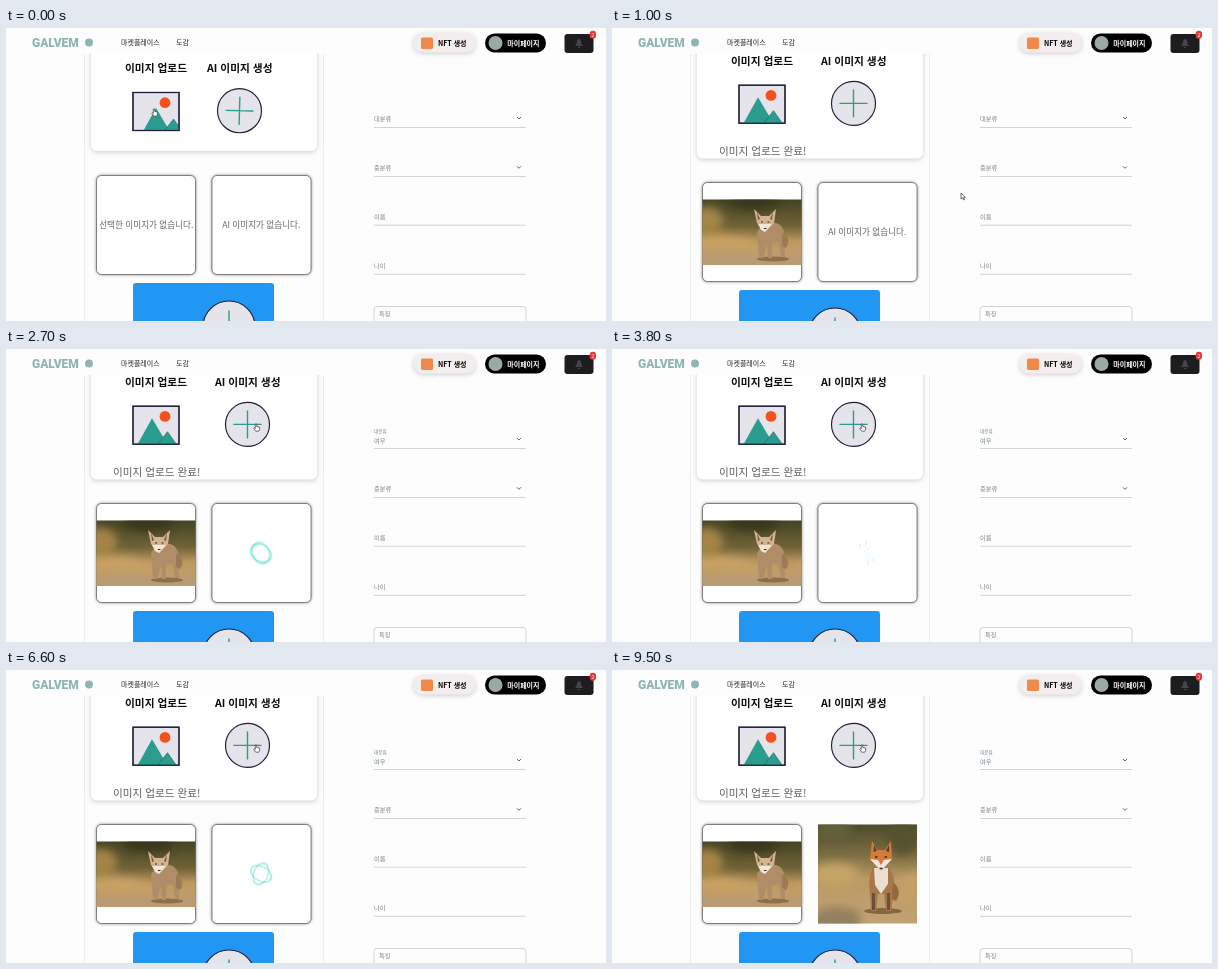
Animation, 600 px wide and 293 px high, one loop 9.6 s. Source, as an HTML page:

```html
<!DOCTYPE html>
<html lang="ko">
<head>
<meta charset="utf-8">
<style>
html, body { margin: 0; width: 100%; height: 100%; overflow: hidden; background: #fdfdfd; }
svg { position: absolute; left: 0; top: 0; }
text { font-family: "Noto Sans CJK KR", "Noto Sans KR", "Noto Sans CJK", sans-serif; }
.title { font-size: 10.7px; font-weight: 700; fill: #0b0b0b; }
.nav { font-size: 7px; font-weight: 500; fill: #222; }
.button { font-size: 7px; font-weight: 700; }
.empty { font-size: 8.6px; fill: #666; text-anchor: middle; }
.label { font-size: 6.2px; fill: #75838a; }
.line { stroke: #c3cbcf; stroke-width: .8; fill: none; }
.shadow { filter: drop-shadow(0 1.5px 2.5px #0003); }
.box { fill: #fff; stroke: #555; stroke-width: .7; filter: drop-shadow(0 .7px 1.7px #0007); }
.icon { fill: #e5e4ea; stroke: #1e1c3a; stroke-width: 1.15; }
.plus { stroke: #2a9d8f; stroke-width: 1.4; stroke-linecap: round; }
#loader { position: absolute; left: 243px; top: 192px; width: 24px; height: 24px; perspective: 320px; }
#loader i { position: absolute; inset: 0; box-sizing: border-box; border: 2.4px solid #36d7b7; border-radius: 50%; opacity: .4; }
</style>
</head>
<body>
<svg width="600" height="293" viewBox="0 0 600 293">
  <defs>
    <filter id="blur"><feGaussianBlur stdDeviation="4"/></filter>
    <filter id="soft"><feGaussianBlur stdDeviation=".5"/></filter>
    <clipPath id="frame"><path d="M127 64.5h46v38h-46z"/></clipPath>
    <clipPath id="wide"><path d="M90.5 164.5h99v65.5h-99z"/></clipPath>
    <clipPath id="square"><path d="M206 147.5h99v99h-99z"/></clipPath>
    <linearGradient id="dusk" x2="0" y2="1">
      <stop stop-color="#454323"/><stop offset=".4" stop-color="#6f6236"/>
      <stop offset=".62" stop-color="#b8945c"/><stop offset="1" stop-color="#c3a174"/>
    </linearGradient>
    <linearGradient id="field" x2="0" y2="1">
      <stop stop-color="#4b4b2b"/><stop offset=".3" stop-color="#7a6c42"/>
      <stop offset=".55" stop-color="#bb9a62"/><stop offset="1" stop-color="#c0a275"/>
    </linearGradient>
  </defs>

  <path d="M78.5 24V293M317.5 24V293" stroke="#ededed"/>

  <rect id="card" class="shadow" x="85" y="10" width="226" height="113" rx="6" fill="#fff"/>
  <g id="upper">
    <text class="title" x="119" y="44.4">이미지 업로드</text>
    <rect class="icon" x="127" y="64.5" width="46" height="38"/>
    <circle cx="159" cy="74.7" r="5.4" fill="#f4511e"/>
    <g clip-path="url(#frame)" fill="#2a9d8f">
      <path id="peak" d="M131 103.5L146 76.5L162 103.5z"/>
      <path id="hill" d="M151 103.5L161.5 90L171 103.5z" stroke="#1f6f6a" stroke-width=".7"/>
    </g>
    <rect class="icon" x="127" y="64.5" width="46" height="38" style="fill:none"/>
    <g id="create">
      <text class="title" x="201" y="44.4">AI 이미지 생성</text>
      <circle class="icon" cx="233.5" cy="82.7" r="22"/>
      <path id="cross" class="plus" d="M220 82.7h27M233.5 69.2v27"/>
    </g>
  </g>
  <text id="done" x="107" y="126.8" font-size="10.6" fill="#5c5c5c">이미지 업로드 완료!</text>

  <g id="lower">
    <rect class="box" x="90.5" y="147.5" width="99" height="99" rx="5"/>
    <rect id="artBox" class="box" x="206" y="147.5" width="99" height="99" rx="5"/>
    <text id="noPhoto" class="empty" x="140.3" y="200">선택한 이미지가 없습니다.</text>
    <text id="noArt" class="empty" x="255.3" y="200">AI 이미지가 없습니다.</text>

    <g id="photo" clip-path="url(#wide)">
      <path d="M90 164h100v67H90z" fill="url(#dusk)"/>
      <g filter="url(#blur)">
        <ellipse cx="95" cy="186" rx="16" ry="14" fill="#a48447"/>
        <ellipse cx="142" cy="167" rx="26" ry="8" fill="#37391d"/>
        <path d="M80 204Q110 196 140 207T200 204V213Q140 219 80 213z" fill="#c9a163"/>
        <path d="M80 222Q120 214 200 221V240H80z" fill="#b99a72"/>
      </g>
      <g filter="url(#soft)">
        <ellipse cx="161" cy="224" rx="16" ry="2.5" fill="#8d7047"/>
        <path d="M151 189Q168 184 172 196L173 222H169L167 207L160 208V223H156L155 209L151 223H147L145 197z" fill="#b08d66"/>
        <path d="M142 174L149 181H157L164 174L162 188L153 197L145 188z" fill="#d3b492"/>
        <path d="M145 177L148 184L146 185zM161 177L158 184L160 185z" fill="#74583f"/>
        <path d="M146 189H160L153 197L149 195z" fill="#efe6d6"/>
        <path d="M149 187h2M155.5 187h2M152 193.5h2.5" stroke="#34261b" stroke-width="1.2"/>
        <path d="M170 197Q180 204 174 213L170 211z" fill="#9b7a55"/>
      </g>
    </g>

    <g id="art" clip-path="url(#square)">
      <path d="M205 147h101v100H205z" fill="url(#field)"/>
      <g filter="url(#blur)">
        <ellipse cx="222" cy="153" rx="18" ry="10" fill="#65613b"/>
        <ellipse cx="291" cy="160" rx="15" ry="18" fill="#56512f"/>
        <ellipse cx="224" cy="197" rx="22" ry="11" fill="#c6a468"/>
        <path d="M200 238Q220 222 248 236V255H200z" fill="#94805f"/>
        <path d="M286 205Q298 192 310 198V225H286z" fill="#c4a065"/>
      </g>
      <g filter="url(#soft)">
        <ellipse cx="271" cy="234" rx="19" ry="3" fill="#816642"/>
        <path d="M262 188Q255 201 258 217L259 234H264L266 217H272L274 234H279L282 214Q284 200 276 188z" fill="#a9774d"/>
        <path d="M262 191H276L276 207L269 217L263 208z" fill="#eadfd0"/>
        <path d="M261.5 216V233M276.5 216V233" stroke="#69503c" stroke-width="3"/>
        <path d="M260 164L265 173H273L279 164L280 182L269 194L258 182z" fill="#d47b3b"/>
        <path d="M262 168L264.5 174L261.5 175zM277 168L274 174L277 175z" fill="#553723"/>
        <path d="M258 182L266 183L269 188L272 183L280 182L269 194z" fill="#f2e7da"/>
        <path d="M263 180h2.4M272.5 180h2.4M267.6 191.5h3" stroke="#332318" stroke-width="1.6"/>
        <path d="M281 205Q291 214 284 224L280 222z" fill="#97683f"/>
      </g>
    </g>

    <rect x="127" y="255" width="141" height="70" rx="3" fill="#2196f3"/>
    <circle class="icon" cx="223" cy="299" r="26"/>
    <path class="plus" d="M223 283v32M207 299h32"/>
  </g>

  <path d="M0 0H600V26H0z" fill="#fdfdfd"/>
  <text x="26" y="18.7" font-size="12" font-weight="900" fill="#8fb5b3" style="font-family:Roboto,sans-serif">GALVEM</text>
  <circle cx="83" cy="14.4" r="4" fill="#8fb5b3"/>
  <text class="nav" x="115" y="17.3">마켓플레이스</text>
  <text class="nav" x="170" y="17.3">도감</text>
  <rect class="shadow" x="407.5" y="5.5" width="62" height="19" rx="9.5" fill="#f4eded"/>
  <rect x="415" y="9.5" width="12" height="11.5" rx="1.5" fill="#f08a4b"/>
  <text class="button" x="432" y="17.5">NFT 생성</text>
  <rect x="479" y="5.5" width="61" height="19" rx="9.5"/>
  <circle cx="489.5" cy="15" r="7" fill="#9aaaa0"/>
  <text class="button" x="501.3" y="17.5" fill="#fff">마이페이지</text>
  <rect x="558.5" y="6" width="29" height="19" rx="3" fill="#1d1d1f"/>
  <path d="M569 18Q571 16 571 13.5Q571 11 573 11T575 13.5Q575 16 577 18zM572 19h2v1h-2z" fill="#45454b"/>
  <rect x="583.7" y="2.7" width="6.3" height="8" rx="3" fill="#e53935"/>
  <text x="586.8" y="8.5" font-size="5" fill="#fff" text-anchor="middle">2</text>

  <text id="category" class="label" x="368" y="92.7">대분류</text>
  <text id="choice" class="label" x="368" y="94.4">여우</text>
  <text class="label" x="368" y="142.1">중분류</text>
  <text class="label" x="368" y="191.1">이름</text>
  <text class="label" x="368" y="240.3">나이</text>
  <text class="label" x="373" y="288.3">특징</text>
  <path class="line" d="M368 99.5H520M368 148.5H520M368 197.2H520M368 246.3H520"/>
  <rect class="line" x="368" y="278.5" width="152" height="40" rx="3"/>
  <path d="M511 89l2 2l2-2M511 138.3l2 2l2-2" fill="none" stroke="#666"/>

  <g id="cursor" fill="#fff" stroke="#333" stroke-width=".7" stroke-linejoin="round">
    <path id="arrow" d="M0 0V6L1.5 4.8L2.6 7L3.5 6.5L2.6 4.4H4.3z"/>
    <path id="hand" d="M-.7 0Q0-.8.7 0V2.4L3.6 3.1V5.4L2.8 7.2H-.3L-2.2 4.4L-1.6 3.7L-.7 4.4z"/>
  </g>
</svg>
<div id="loader"><i></i><i></i></div>
<script>
const LOOP = 9600, STEP = 100;
const UPLOADED = 700, CHOSEN = 1800, LOADING = 2500, LOADED = 8400, FINISHED = 9000;
const $ = id => document.getElementById(id);
const [ringA, ringB] = $('loader').children;
const path = [[0, 148, 81], [500, 148, 81], [1000, 349, 165], [1400, 440, 90], [1800, 400, 104], [2500, 250, 75]];

const show = (id, on) => { $(id).style.display = on ? '' : 'none'; };
const move = (id, x, y) => $(id).setAttribute('transform', `translate(${x} ${y})`);

function cursorAt(t) {
  const i = path.findIndex(p => p[0] > t);
  if (i < 0) return path[path.length - 1].slice(1);
  const [t0, x0, y0] = path[i - 1], [t1, x1, y1] = path[i];
  const k = (t - t0) / (t1 - t0), e = k * k * (3 - 2 * k);
  return [x0 + (x1 - x0) * e, y0 + (y1 - y0) * e];
}

function draw(t) {
  const uploaded = t >= UPLOADED, chosen = t >= CHOSEN;
  const loading = t >= LOADING, finished = t >= FINISHED;
  $('card').setAttribute('height', uploaded ? 120.5 : 113);
  move('upper', 0, uploaded ? -7.3 : 0);
  move('create', uploaded ? 8 : 0, 0);
  move('lower', 0, uploaded ? 7 : 0);
  move('peak', uploaded ? 0 : 4, uploaded ? 0 : 3.5);
  move('hill', uploaded ? 0 : 6, uploaded ? 0 : 1);
  $('cross').setAttribute('transform', `rotate(${uploaded ? 0 : 1.5} 233.5 82.7)`);
  show('done', uploaded);
  show('photo', uploaded);
  show('noPhoto', !uploaded);
  show('noArt', !loading);
  show('art', finished);
  show('artBox', !finished);
  show('choice', chosen);
  $('category').setAttribute('y', chosen ? 83.5 : 92.7);
  $('category').style.fontSize = chosen ? '4.6px' : '';

  const [x, y] = cursorAt(t), hand = t <= 500 || t >= 2400;
  move('cursor', x, y);
  show('hand', hand);
  show('arrow', !hand);

  // Two rings tumble about swapped axes and lie edge-on at half a turn.
  show('loader', loading && t < LOADED);
  const turn = (4.5 + (t - 4995) * .00148) % 1;
  const spin = (a, b) => `rotateX(${a * turn}deg) rotateY(${b * turn}deg) rotateZ(${360 * turn}deg)`;
  ringA.style.transform = spin(180, 360);
  ringB.style.transform = spin(360, 180);
}

function tick() {
  draw(Math.floor(performance.now() % LOOP / STEP) * STEP);
  requestAnimationFrame(tick);
}
tick();
</script>
</body>
</html>
```
